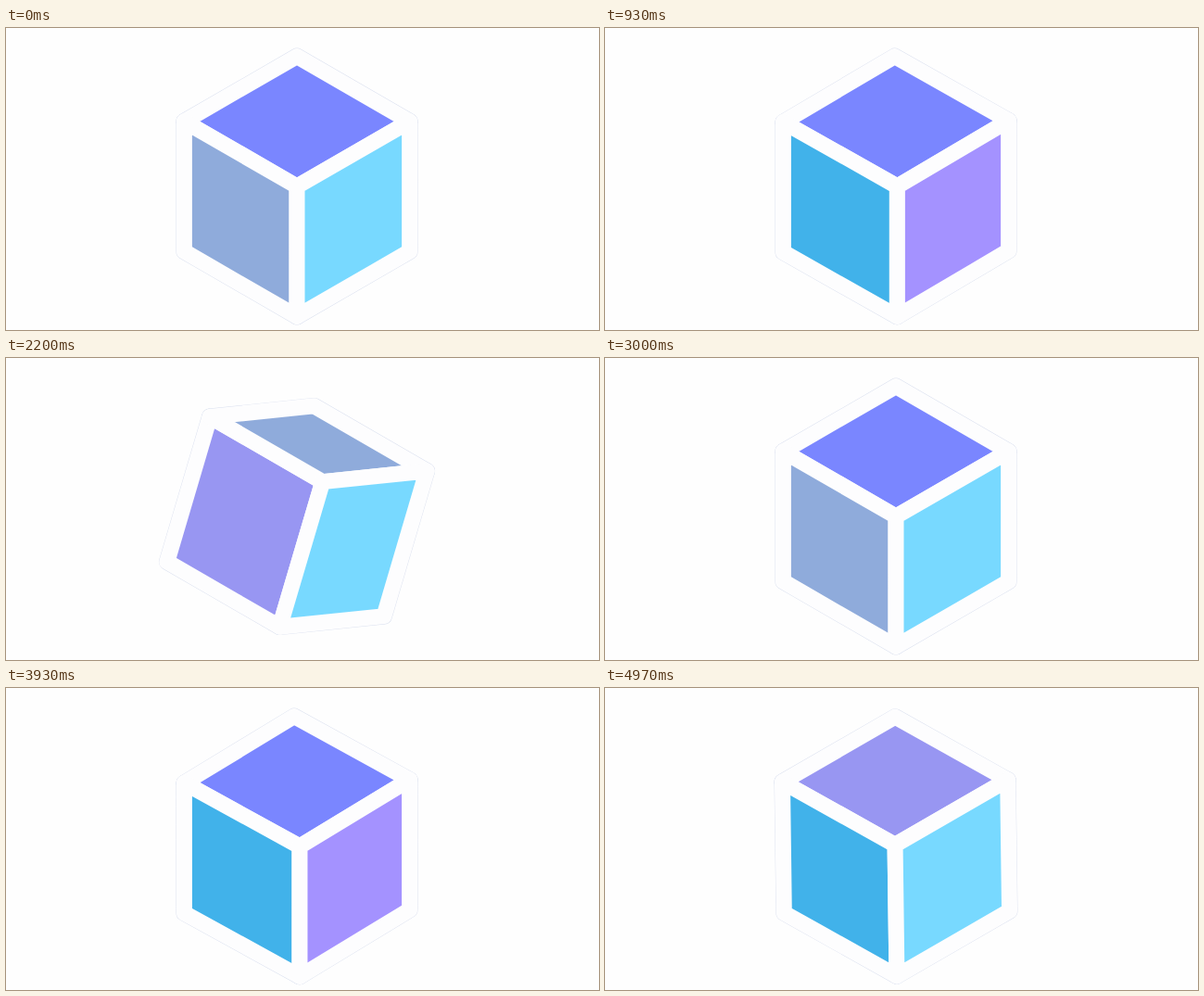
Write an HTML page that moves like this. It is 640x326 px and loops after 5000 ms.

```html
<!DOCTYPE html>
<html lang="en">
<head>
<meta charset="utf-8">
<title>Turning cube</title>
<style>
  html, body { margin: 0; width: 100%; height: 100%; overflow: hidden; background: #fefefe; }
  svg { display: block; width: 100%; height: 100%; }
  path { stroke-linejoin: round; }
  .rim { fill: none; stroke: #d9dfee; stroke-width: 17.8; }
  .face { stroke: #fdfdfe; stroke-width: 17; }
</style>
</head>
<body>
<svg viewBox="0 0 640 326">
  <g id="rims"></g>
  <g id="faces"></g>
</svg>
<script>
const LOOP = 5000;
const CENTER = [314, 171];
const HALF = 86;

// Isometric resting directions: x right, y down, z towards the viewer.
const X = Math.SQRT1_2, Y = Math.sqrt(1 / 6), Z = Math.sqrt(1 / 3);
const REST = { top: [0, -2 * Y, Z], left: [-X, Y, Z], right: [X, Y, Z] };
const AXES = Object.keys(REST);

// Each half turn carries the first direction towards the second.
const TURNS = [['right', 'left'], ['top', 'right'], ['top', 'left']];
const STARTS = [-0.02, 0.975, 1.99, 3.008, 4.03];

const SIDES = [
  { axis: 'top', sign: 1, color: '#7a86ff' },
  { axis: 'top', sign: -1, color: '#9896f2' },
  { axis: 'left', sign: 1, color: '#8fabdb' },
  { axis: 'left', sign: -1, color: '#41b2ea' },
  { axis: 'right', sign: 1, color: '#78d9ff' },
  { axis: 'right', sign: -1, color: '#a492ff' }
];

function addPath(parent, className) {
  const path = document.createElementNS('http://www.w3.org/2000/svg', 'path');
  path.setAttribute('class', className);
  return document.getElementById(parent).appendChild(path);
}

for (const side of SIDES) {
  side.rim = addPath('rims', 'rim');
  side.face = addPath('faces', 'face');
  side.face.setAttribute('fill', side.color);
}

const easeOut = p => 1 - (1 - p) ** 2;
const mix = (a, ka, b, kb) => a.map((v, i) => v * ka + b[i] * kb);

// Motion advances at 25 steps a second, shown on a 30 Hz clock.
function stepTime(ms) {
  const slot = Math.floor((ms + 4) * 0.03);
  return Math.floor(slot * 5 / 6 + 1e-6) / 25;
}

function pose(seconds) {
  const signs = { top: 1, left: 1, right: 1 };
  const turn = STARTS.filter(start => start <= seconds).length - 1;
  for (let i = 0; i < turn; i++) {
    for (const axis of TURNS[i % 3]) signs[axis] *= -1;
  }
  const progress = seconds === 0 ? 0 : Math.min(1, seconds - STARTS[turn]);
  const angle = Math.PI * easeOut(progress);
  const cos = Math.cos(angle), sin = Math.sin(angle);
  const [from, to] = TURNS[turn % 3];
  const axes = { ...REST };
  axes[from] = mix(REST[from], cos, REST[to], sin);
  axes[to] = mix(REST[to], cos, REST[from], -sin);
  for (const axis of AXES) axes[axis] = axes[axis].map(v => v * signs[axis]);
  return axes;
}

function outline(normal, u, v) {
  const corners = [[1, 1], [1, -1], [-1, -1], [-1, 1]].map(([a, b]) =>
    CENTER.map((c, i) => (c + HALF * (normal[i] + a * u[i] + b * v[i])).toFixed(2)));
  return 'M' + corners.join('L') + 'Z';
}

function render(ms) {
  const axes = pose(stepTime(ms));
  for (const { axis, sign, rim, face } of SIDES) {
    const normal = axes[axis].map(v => v * sign);
    const [u, v] = AXES.filter(name => name !== axis).map(name => axes[name]);
    const d = normal[2] > 0.001 ? outline(normal, u, v) : '';
    rim.setAttribute('d', d);
    face.setAttribute('d', d);
  }
}

const began = performance.now();
function tick() {
  render((performance.now() - began) % LOOP);
  requestAnimationFrame(tick);
}
tick();
</script>
</body>
</html>
```
